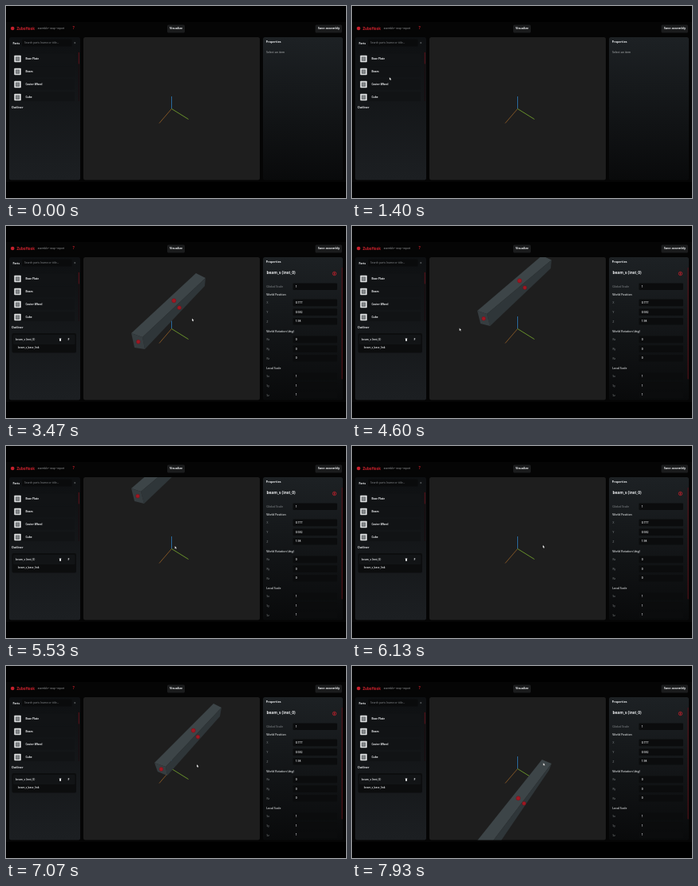
Animation of 426x240 px, one loop 8000 ms. Source, as an HTML page:

```html
<!DOCTYPE html>
<html lang="en">
<head>
<meta charset="utf-8">
<title>Assembly editor</title>
<style>
  html, body { margin: 0; width: 100%; height: 100%; overflow: hidden; background: #000; }
  svg { display: block; width: 100vw; height: 100vh; }
  text { font-family: "Open Sans", "Noto Sans", sans-serif; fill: #eceef0; }
  .b { font-weight: 700; }
  .s { font-weight: 600; }
  .dim { fill: #8b8f93; }
</style>
</head>
<body>
<svg id="stage" viewBox="0 0 426 240">
  <defs>
    <linearGradient id="left" x2="0" y2="1"><stop stop-color="#0e1012"/><stop offset="1" stop-color="#1c1f22"/></linearGradient>
    <linearGradient id="right" x2="0" y2="1"><stop stop-color="#1d2124"/><stop offset="1" stop-color="#090a0b"/></linearGradient>
    <clipPath id="view"><rect x="97" y="39" width="221" height="178.5" rx="2.5"/></clipPath>
    <clipPath id="list"><rect x="4" y="56" width="89" height="63"/></clipPath>
    <clipPath id="form"><rect x="322" y="39" width="100" height="178.5"/></clipPath>
  </defs>
  <g id="base"></g>
  <g id="empty"></g>
  <g id="filled"></g>
  <g clip-path="url(#view)">
    <g fill="none" stroke-width=".9">
      <path d="M207.5 128.5V113" stroke="#2b72ac"/>
      <path d="M207.5 128.5L192 146.5" stroke="#8a5a26"/>
      <path d="M207.5 128.5L228.5 141.5" stroke="#6f9c2c"/>
    </g>
    <g id="beam">
      <polygon id="top" fill="#3d4548"/>
      <polygon id="side" fill="#2f3639"/>
      <polygon id="end" fill="#363d40"/>
      <g id="dots" fill="#a01722" stroke="#6e1018" stroke-width=".4">
        <circle r="2.6"/><circle r="2.4"/><circle r="2.4"/>
      </g>
    </g>
  </g>
  <path id="cursor" d="M0 0V3.6L.9 2.9 1.5 4.1 2.1 3.8 1.6 2.6H2.6Z" fill="#fff" stroke="#111" stroke-width=".25"/>
</svg>
<script>
const $ = id => document.getElementById(id);
const LOOP = 8000, DROP = 2800, HOVER = 1450;

const box = (x, y, w, h, fill, rx = 1.5, more = '') =>
  `<rect x="${x}" y="${y}" width="${w}" height="${h}" rx="${rx}" fill="${fill}" ${more}/>`;
// y is the middle of the line
const label = (s, x, y, size, cls = '', more = '') =>
  `<text x="${x}" y="${y + size * .36}" font-size="${size}" class="${cls}" ${more}>${s}</text>`;

function partRow(name, i) {
  const y = 66 + i * 16;
  return box(8, y - 6.5, 78, 13, '#111315', 1.5, `id="row${i}"`) +
    box(10.3, y - 4.2, 8.5, 8.5, '#dcdedf', .8) +
    box(12, y - 2.6, 5.1, 5.3, '#63676a', .4) +
    `<path d="M12.7 ${y - .9}h3.7m-3.7 1.8h3.7" stroke="#d5d7d8" stroke-width=".5"/>` +
    label(name, 24.6, y + .3, 3.2, 'b');
}

function field(name, value, y, x = 326.5) {
  return label(name, x, y, name.length > 2 ? 3.7 : 3.3, 'dim') +
    box(359.5, y - 4.4, 55.5, 8.6, '#0b0c0d', 1.2) +
    label(value, 362.7, y - .3, 3.4, 's');
}

$('base').innerHTML =
  box(0, 20, 426, 200, '#050505', 0) +
  '<circle cx="8.2" cy="28" r="2.3" fill="#c8202c"/>' +
  label('ZuboHook', 13.5, 28, 4.4, 'b', 'style="fill:#d3222e"') +
  label('assemble • snap • export', 39.8, 28.2, 2.9, '', 'style="fill:#a4a6a8"') +
  label('?', 83.4, 27.7, 4.8, 'b', 'style="fill:#c01e2a"') +
  box(202, 23.5, 22, 10, '#1b1c1d') +
  label('Visualize', 213, 28.1, 3.7, 'b', 'text-anchor="middle"') +
  box(387.5, 23.5, 33.5, 10, '#1b1c1d') +
  label('Save assembly', 404.5, 27.9, 3.8, 'b', 'text-anchor="middle"') +
  box(4, 39, 89, 178.5, 'url(#left)', 2.5) +
  box(97, 39, 221, 178.5, '#1e1e1e', 2.5) +
  label('Parts', 8.5, 46.4, 3.3, 'b') +
  box(20, 41.5, 62.5, 9, '#0a0b0c') +
  label('Search parts (name or title…', 23, 46, 3.3, 'dim') +
  label('×', 85.1, 45.9, 4.5, 'dim') +
  '<g clip-path="url(#list)">' +
  ['Base Plate', 'Beam', 'Caster Wheel', 'Cube'].map(partRow).join('') + '</g>' +
  box(90.8, 57, .9, 62, '#1d0c0f', .4) +
  box(90.8, 58, .9, 14.5, '#64161d', .4) +
  label('Outliner', 7, 126.8, 3.45, 'b') +
  box(322, 39, 100, 178.5, 'url(#right)', 2.5) +
  label('Properties', 325.8, 45.1, 3.65, 'b');

$('empty').innerHTML =
  label('Select an item', 326, 57.4, 3.55, '', 'style="fill:#b8bbbd"');

const groups = [
  ['World Position', 86, ['X', 'Y', 'Z'], ['0.777', '0.582', '1.98']],
  ['World Rotation (deg)', 132, ['Rx', 'Ry', 'Rz'], [0, 0, 0]],
  ['Local Scale', 178, ['Sx', 'Sy', 'Sz'], [1, 1, 1]]
];
$('filled').innerHTML =
  label('beam_s (inst_0)', 326.5, 58.4, 4.8, 'b') +
  '<circle cx="411.5" cy="59.5" r="2.2" fill="none" stroke="#c3202c" stroke-width=".8"/>' +
  box(410.9, 58.3, 1.2, 2.4, '#c3202c', .3) +
  '<g clip-path="url(#form)">' + field('Global Scale', 1, 75.8, 326.3) +
  groups.map(([title, y, names, values]) =>
    label(title, 326.2, y, 3.5, 's', 'style="fill:#d6d9db"') +
    names.map((n, i) => field(n, values[i], y + 10 + i * 11.7)).join('')).join('') + '</g>' +
  box(420.6, 52, 1, 139.5, '#5c1118', .5) +
  box(7.5, 134, 80.5, 24.5, '#0c0d0e', 2) +
  box(9, 136, 77.5, 12, '#121416') +
  label('beam_s (inst_0)', 12, 142.1, 3.3, 's') +
  label('beam_s_base_link', 15, 152, 3.1, 's') +
  box(67, 140.9, 2, 2.9, '#eceef0', .4) + box(66.6, 140.2, 2.8, .6, '#eceef0', .2) +
  label('F', 77.6, 142, 3.6, 'b');

// near end: left, ridge, right, bottom; far end: left, ridge, right
const drop = [157,134, 171,139, 174,154, 161,152, 238,59, 250,65, 249,75];
const high = [157,106, 169,110, 173,125, 161,122, 238,37, 250,42.5, 249,53];
const right = [186,121, 200,126, 202,137, 190,132, 260,47, 270,52, 268,63];
const low = [150,227, 168,230, 172,240, 154,238, 238,117, 250,122, 247,130];
const raise = (pose, d) => pose.map((v, i) => i % 2 ? v - d : v);

const beamKeys = [
  [DROP, drop], [3550, drop], [4200, high], [5130, high], [5900, raise(high, 100)],
  [6200, raise(right, 110)], [6950, right], [7150, right], [7900, low], [LOOP, low]
];
const cursorKeys = [
  [850, [92, 140]], [HOVER, [46, 88]], [1750, [42, 82]], [1950, [42, 82]], [2500, [205, 117.5]],
  [DROP, [207, 118]], [3350, [233, 115.5]], [3550, [233, 115.5]], [4350, [134.5, 127.5]],
  [5000, [134.5, 127.5]], [5800, [239, 124]], [7070, [239, 123]], [7900, [239.5, 121]], [LOOP, [239.5, 121]]
];

const lerp = (a, b, k) => a.map((v, i) => v + (b[i] - v) * k);
function sample(keys, t) {
  let i = keys.findIndex(k => k[0] > t);
  if (i < 1) return keys[i ? keys.length - 1 : 0][1];
  const [t0, a] = keys[i - 1], [t1, b] = keys[i];
  const k = (t - t0) / (t1 - t0);
  return lerp(a, b, k * k * (3 - 2 * k));
}
const show = (id, on) => $(id).setAttribute('visibility', on ? 'visible' : 'hidden');
const mean = (...pts) => [0, 1].map(j => pts.reduce((s, p) => s + p[j], 0) / pts.length);

function drawBeam(pose) {
  const [a, b, c, d, e, f, g] = Array.from({ length: 7 }, (_, i) => pose.slice(i * 2, i * 2 + 2));
  const face = (id, ...pts) => $(id).setAttribute('points', pts.join(' '));
  face('top', a, b, f, e);
  face('side', b, c, g, f);
  face('end', a, b, c, d);
  const spots = [
    lerp(mean(a, b), mean(e, f), .58),
    lerp(mean(b, c), mean(f, g), .58),
    mean(a, b, c, d)
  ];
  [...$('dots').children].forEach((dot, i) => {
    dot.setAttribute('cx', spots[i][0]);
    dot.setAttribute('cy', spots[i][1]);
  });
}

function draw(now) {
  const t = now % LOOP, placed = t >= DROP;
  show('empty', !placed);
  show('filled', placed);
  show('beam', placed);
  show('cursor', t >= cursorKeys[0][0]);
  $('row1').setAttribute('fill', t >= HOVER && !placed ? '#24282a' : '#111315');
  if (placed) drawBeam(sample(beamKeys, t));
  $('cursor').setAttribute('transform', `translate(${sample(cursorKeys, t)})`);
}

const start = performance.now();
function tick() {
  draw(performance.now() - start);
  requestAnimationFrame(tick);
}
tick();
</script>
</body>
</html>
```
